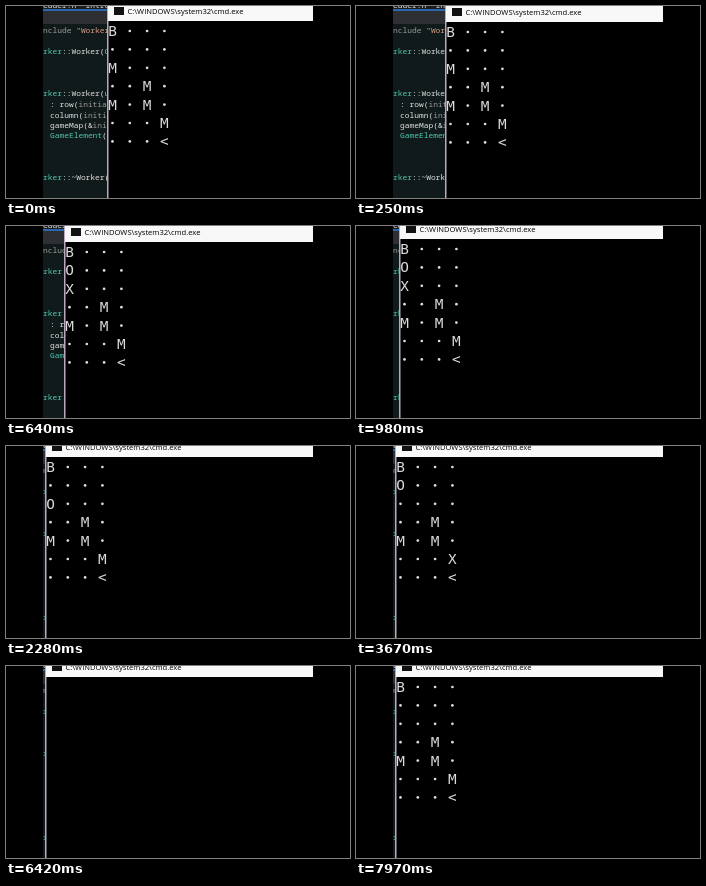
Recreate the animation shown at these times as an HTML page with a canvas. Size 344x192 px, loop 8000 ms.

```html
<!DOCTYPE html>
<html lang="en">
<head>
<meta charset="utf-8">
<style>
html, body { margin: 0; width: 100%; height: 100%; overflow: hidden; background: #000; }
canvas { display: block; }
</style>
</head>
<body>
<canvas id="stage" width="344" height="192"></canvas>
<script>
const ctx = document.getElementById('stage').getContext('2d');
const LOOP = 8000, LEFT = 37, RIGHT = 307;
const CODE_FONT = '7.9px "Noto Sans Mono", monospace';
const GRID_FONT = '14.4px "DejaVu Sans Mono", monospace';
const TITLE_FONT = '500 7.6px "Open Sans", sans-serif';

// Window drag: time, x of the left edge, y of the title bar's lower edge
const drag = [[130, 102, 15], [430, 73, 17], [700, 55, 15.5], [980, 44, 13], [1260, 40, 11]];

const board = ['B...', '....', '....', '..M.', 'M.M.', '...M', '...<'];
// Pieces laid over the board from a given time on: row, column, letter
const moves = [
  [0, '20M'], [300, '10O 20X'], [2220, '20O 63X'], [2280, '20O'],
  [3310, '10O'], [3670, '10O 53X'], [4700, '20O 63X'], [4860, '']
];
const clears = [6420, 7380, 7940];
const CLEAR_MS = 30;
const prompt = 'Enter a letter to continue:';

const TEAL = '#4ec9b0', PALE = '#e2e2e2', GRAY = '#9a9a9a', STRING = '#d69d85';
// Each line: x, baseline, then runs of colour and text
const code = [
  [37, 27, GRAY, 'nclude ', STRING, '"Worker.h"'],
  [37, 48, TEAL, 'rker', PALE, '::Worker(', TEAL, 'Ga'],
  [37, 90, TEAL, 'rker', PALE, '::Worker(', TEAL, 'un'],
  [44, 101, PALE, ': row(', GRAY, 'initialRow'],
  [44, 112, PALE, 'column(', GRAY, 'initialC'],
  [44, 122, PALE, 'gameMap(&', GRAY, 'initial'],
  [44, 132, TEAL, 'GameElement', PALE, '(', GRAY, 'row'],
  [37, 174, TEAL, 'rker', PALE, '::~Worker()']
];

function rect(x, y, w, h, color) {
  ctx.fillStyle = color;
  ctx.fillRect(x, y, w, h);
}

function text(str, x, y, font, color, align = 'left') {
  ctx.font = font;
  ctx.fillStyle = color;
  ctx.textAlign = align;
  ctx.fillText(str, x, y);
}

function dot(x, y, color) {
  ctx.fillStyle = color;
  ctx.beginPath();
  ctx.arc(x, y, 1.35, 0, 2 * Math.PI);
  ctx.fill();
}

function windowAt(t) {
  const next = drag.findIndex(p => p[0] > t);
  if (next === 0) return drag[0].slice(1);
  if (next < 0) return drag[drag.length - 1].slice(1);
  const a = drag[next - 1], b = drag[next];
  const k = (t - a[0]) / (b[0] - a[0]);
  return [1, 2].map(i => Math.round(a[i] + (b[i] - a[i]) * k));
}

function cellsAt(t) {
  const cells = board.map(row => [...row]);
  const pieces = moves.filter(m => m[0] <= t).pop()[1];
  for (const [r, c, letter] of pieces.split(' ').filter(Boolean)) cells[r][c] = letter;
  return cells;
}

function drawEditor() {
  rect(LEFT, 0, 70, 192, '#111a1b');
  rect(LEFT, 0, 70, 18, '#2d2f32');
  rect(LEFT, 0, 70, 3, '#1b1c1f');
  text('eader.h  intro.cpp', LEFT, 1.5, CODE_FONT, PALE);
  rect(LEFT, 3, 70, 2, '#2a66ad');
  for (const [left, y, ...runs] of code) {
    let x = left;
    for (let i = 0; i < runs.length; i += 2) {
      text(runs[i + 1], x, y, CODE_FONT, runs[i]);
      x += ctx.measureText(runs[i + 1]).width;
    }
  }
}

function drawConsole(t) {
  const [x, y] = windowAt(t);
  rect(x, 0, RIGHT - x, 192, '#000');
  rect(x - 1, 0, 1.5, 192, '#b9a9bd');
  rect(x, 0, RIGHT - x, y, '#f8f8f8');
  rect(x + 6, y - 14, 10, 8, '#111');
  text('C:\\WINDOWS\\system32\\cmd.exe', x + 19.5, y - 7.5, TITLE_FONT, '#000');

  if (clears.some(c => t >= c && t < c + CLEAR_MS)) return;
  const ink = '#dcdcdc';
  cellsAt(t).forEach((row, r) => row.forEach((cell, c) => {
    const cx = x + 4.5 + 17.3 * c, cy = y + 10 + 18.4 * r;
    if (cell === '.') dot(cx, cy, ink);
    else text(cell, cx, cy + 5, GRID_FONT, ink, 'center');
  }));
  if (t >= 5220 && t < 7940) text(prompt, x, y + 162, GRID_FONT, ink);
}

function frame(now) {
  rect(0, 0, 344, 192, '#000');
  ctx.save();
  ctx.beginPath();
  ctx.rect(LEFT, 0, RIGHT - LEFT, 192);
  ctx.clip();
  drawEditor();
  drawConsole(now % LOOP);
  ctx.restore();
  requestAnimationFrame(frame);
}
requestAnimationFrame(frame);
</script>
</body>
</html>
```
